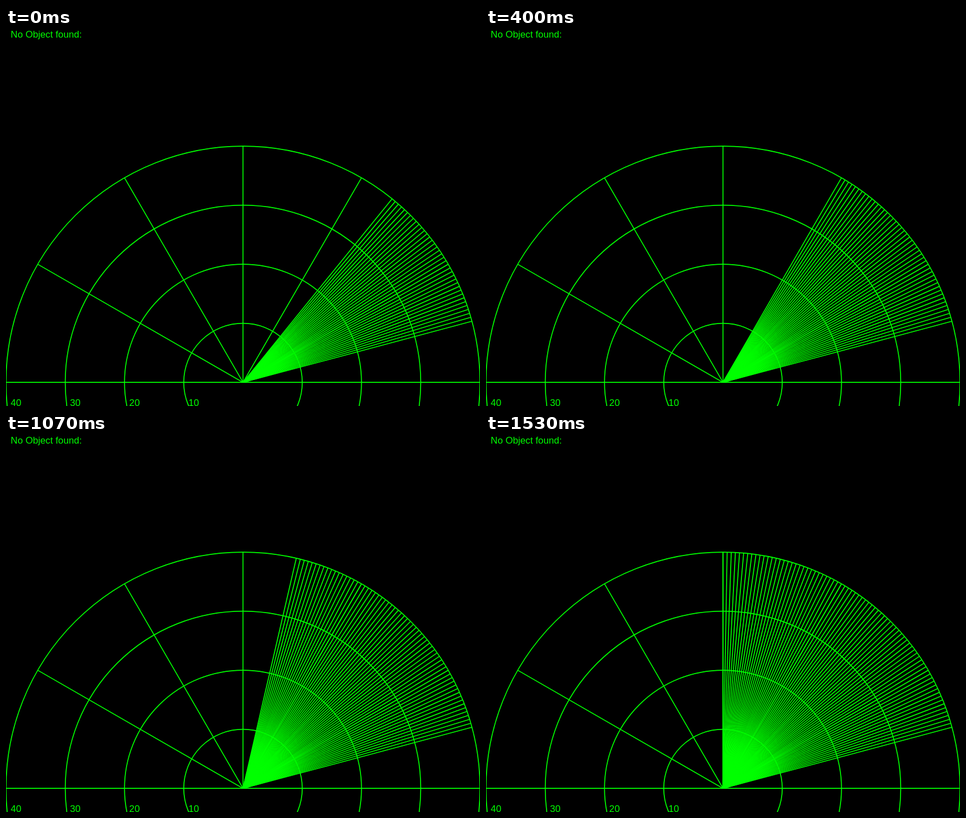
An HTML page with a canvas that plays this animation: 837x669 px, repeating every 1590 ms.

```html
<!DOCTYPE html>
<html lang="en">
<head>
<meta charset="utf-8">
<title>Radar sweep</title>
<style>
html, body { margin: 0; width: 100%; height: 100%; overflow: hidden; background: #000; }
canvas { display: block; }
</style>
</head>
<body>
<canvas id="radar" width="837" height="669"></canvas>
<script>
const ctx = document.getElementById('radar').getContext('2d');
const LOOP = 1590, FPS = 15;
const W = 1000, H = 800, CX = 500, CY = 750, R = 500;
const FIRST_RAY = 15;

function ray(deg) {
  const a = deg * Math.PI / 180;
  ctx.moveTo(CX, CY);
  ctx.lineTo(CX + R * Math.cos(a), CY - R * Math.sin(a));
}

function stroke(build) {
  ctx.beginPath();
  build();
  ctx.stroke();
}

// Steps fall on a 15 fps clock rounded to 10 ms.
function stepAt(ms) {
  return Math.floor((Math.floor(ms / 10) * 10 + 5) * FPS / 1000);
}

// One degree per step at first, then a faster steady sweep.
function leadAngle(step) {
  return step < 4 ? 51 + step : Math.floor(55.99 + 1.81 * (step - 4));
}

function draw(lead) {
  ctx.setTransform(837 / W, 0, 0, 669 / H, 0, 0);
  ctx.fillStyle = '#000';
  ctx.fillRect(0, 0, W, H);
  ctx.strokeStyle = ctx.fillStyle = '#0f0';
  ctx.lineWidth = 2;
  ctx.font = '20px "Liberation Sans", Arial, sans-serif';

  for (let i = 1; i <= 4; i++) {
    const r = i * R / 4;
    stroke(() => ctx.arc(CX, CY, r, 0, 2 * Math.PI));
    ctx.fillText(i * 10, CX - r + 10, H);
  }
  for (let deg = 0; deg <= 180; deg += 30) stroke(() => ray(deg));
  for (let deg = FIRST_RAY; deg <= lead; deg++) stroke(() => ray(deg));
  ctx.fillText('No Object found:', 10, 20);
}

let start, shown;
function tick(now) {
  start ??= now;
  const lead = leadAngle(stepAt((now - start) % LOOP));
  if (lead !== shown) draw(shown = lead);
  requestAnimationFrame(tick);
}
draw(shown = leadAngle(0));
requestAnimationFrame(tick);
</script>
</body>
</html>
```
